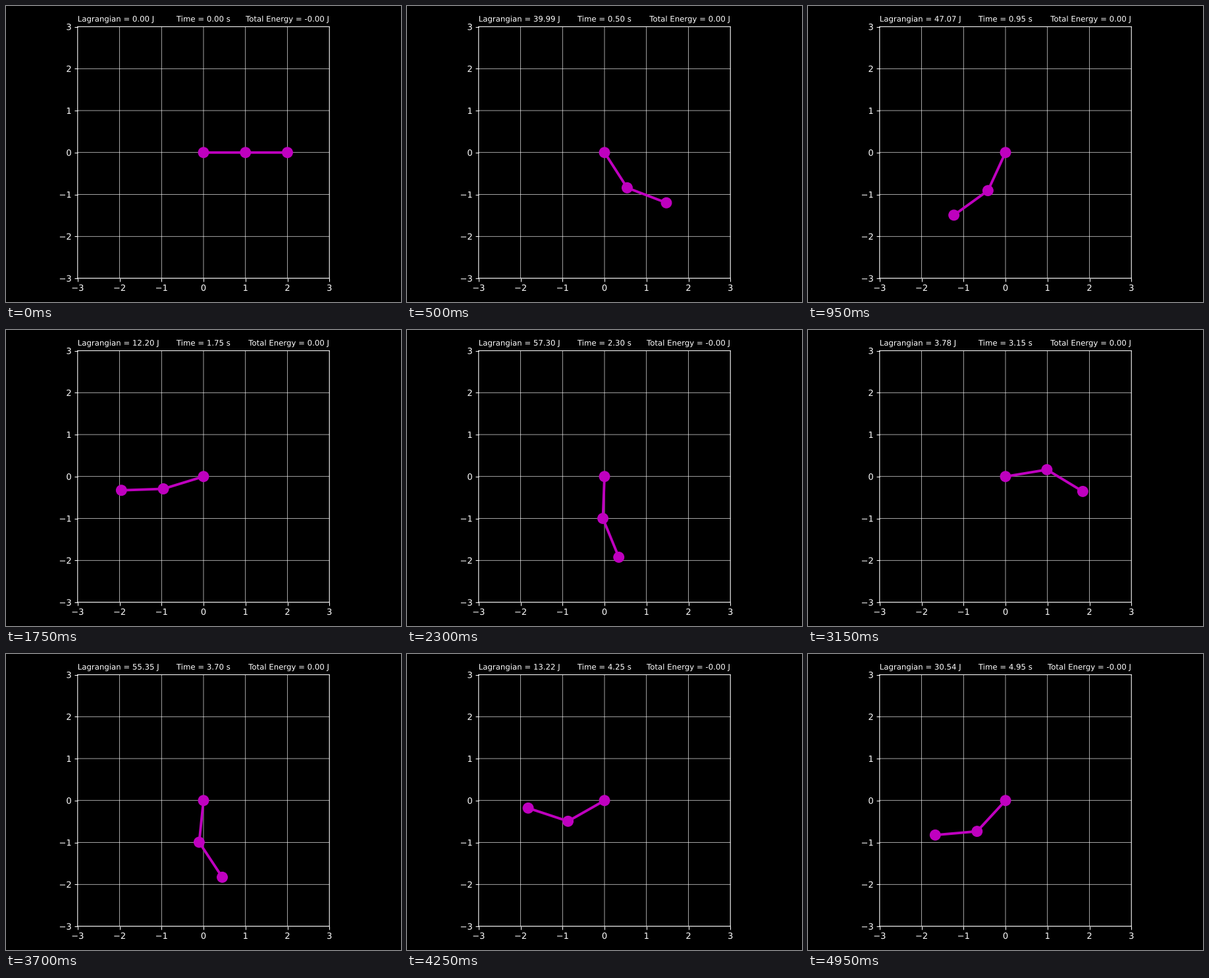
Recreate the animation shown at these times as a matplotlib script. Size 600x450 px, loop 5000 ms.

```python
import numpy as np
import matplotlib.pyplot as plt
from matplotlib.animation import FuncAnimation
from matplotlib.patheffects import Normal

G = 9.8
FRAMES = 100
INTERVAL = 50  # ms
SUBSTEPS = 50


def derivative(state):
    """Double pendulum with unit masses and rods, angles from straight down."""
    a, b, wa, wb = state
    s, c = np.sin(a - b), np.cos(a - b)
    pa = -wb**2 * s - 2 * G * np.sin(a)
    pb = wa**2 * s - G * np.sin(b)
    det = 2 - c * c
    return np.array([wa, wb, (pa - c * pb) / det, (2 * pb - c * pa) / det])


def rk4(state, h):
    k1 = derivative(state)
    k2 = derivative(state + h / 2 * k1)
    k3 = derivative(state + h / 2 * k2)
    k4 = derivative(state + h * k3)
    return state + h / 6 * (k1 + 2 * k2 + 2 * k3 + k4)


def simulate():
    state = np.array([np.pi / 2, np.pi / 2, 0, 0])
    states = [state]
    h = INTERVAL / 1000 / SUBSTEPS
    for _ in range(FRAMES - 1):
        for _ in range(SUBSTEPS):
            state = rk4(state, h)
        states.append(state)
    return states


def energies(state):
    a, b, wa, wb = state
    kinetic = wa**2 + wb**2 / 2 + wa * wb * np.cos(a - b)
    potential = -G * (2 * np.cos(a) + np.cos(b))
    return kinetic, potential


states = simulate()

plt.style.use("dark_background")
plt.rcParams.update({
    "font.family": "DejaVu Sans",
    "text.hinting": "none",
    # Draw text, lines and markers at sub-pixel positions.
    "path.snap": False,
    "path.effects": [Normal()],
})
fig = plt.figure(figsize=(6.4, 4.8), dpi=93.75)
ax = fig.add_axes([0.18125, 0.08, 0.6375, 0.85])
ax.set(xlim=(-3, 3), ylim=(-3, 3))
ax.set_xticks(range(-3, 4))
ax.set_yticks(range(-3, 4))
ax.grid(linewidth=0.5)

rods, = ax.plot([], [], "o-", color="m", lw=3, markersize=12)
left, center, right = (
    ax.set_title("", loc=loc, fontsize=9) for loc in ("left", "center", "right")
)


def update(i):
    a, b = states[i][:2]
    x = np.cumsum([0, np.sin(a), np.sin(b)])
    y = -np.cumsum([0, np.cos(a), np.cos(b)])
    rods.set_data(x, y)
    kinetic, potential = energies(states[i])
    left.set_text(f"Lagrangian = {kinetic - potential:.2f} J")
    center.set_text(f"Time = {i * INTERVAL / 1000:.2f} s")
    right.set_text(f"Total Energy = {kinetic + potential:.2f} J")
    return rods, left, center, right


anim = FuncAnimation(fig, update, frames=FRAMES, interval=INTERVAL,
                     repeat=True, repeat_delay=0)
plt.show()
```
